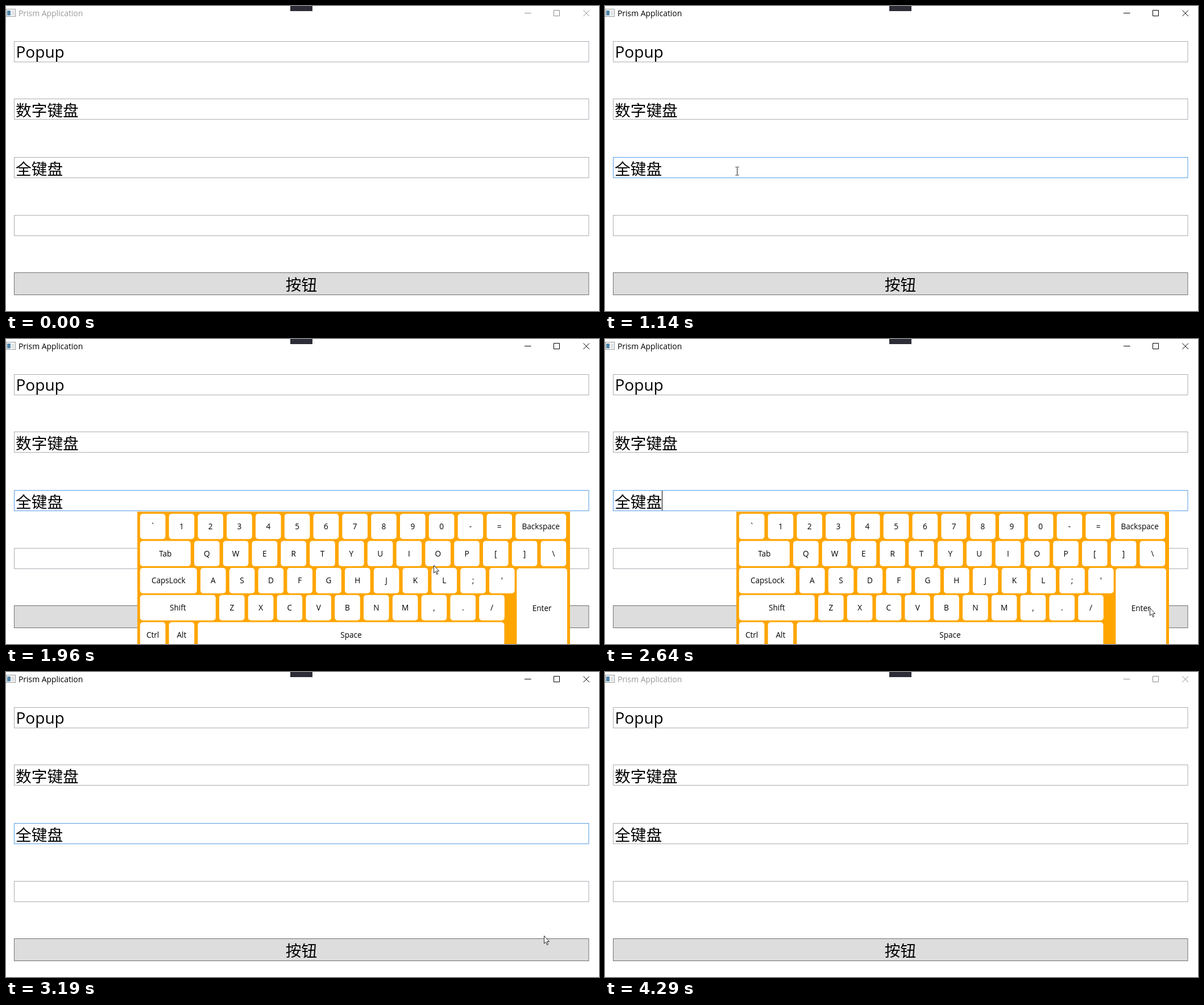
Write an HTML page that moves like this. It is 1043 px wide and 537 px high and loops after 4.37 s.

```html
<!DOCTYPE html>
<html lang="zh">
<head>
<meta charset="utf-8">
<style>
  html, body { margin: 0; width: 100%; height: 100%; overflow: hidden; background: #fff; }
  svg { display: block; width: 1043px; height: 537px; }
  text { font-family: "Open Sans", "Noto Sans", "Noto Sans CJK SC", "Noto Sans CJK", sans-serif; }
  .title { font-size: 13.9px; }
  .big { font-size: 28px; }
  .cjk { font-size: 27.7px; font-family: "Noto Sans CJK SC", "Noto Sans CJK", sans-serif; }
  .key { font-size: 13.6px; text-anchor: middle; }
  .mid { text-anchor: middle; }
</style>
</head>
<body>
<svg id="stage" viewBox="0 0 1043 537"></svg>
<script>
const LOOP = 4370;
const stage = document.getElementById('stage');

function add(parent, tag, attrs, label) {
  const node = document.createElementNS('http://www.w3.org/2000/svg', tag);
  for (const name in attrs) node.setAttribute(name, attrs[name]);
  if (label !== undefined) node.textContent = label;
  return parent.appendChild(node);
}
const rect = (parent, x, y, width, height, more) =>
  add(parent, 'rect', { x, y, width, height, ...more });
const text = (parent, x, y, cls, label) => add(parent, 'text', { x, y, class: cls }, label);
const show = (node, on) => node.setAttribute('visibility', on ? 'visible' : 'hidden');

// Window chrome
rect(stage, 0.5, 5.5, 16, 13, { fill: '#fafafa', stroke: '#9a9a9a' });
rect(stage, 2, 8, 6, 8.5, { fill: '#4f83a8' });
rect(stage, 9.5, 8, 5, 8.5, { fill: '#dfe3e6' });
const title = text(stage, 22, 18, 'title', 'Prism Application');
const chrome = add(stage, 'path', {
  d: 'M912 12.5h11.5M963.5 7.5h10v10h-10zM1015.5 7.5l10.5 10.5M1026 7.5l-10.5 10.5', fill: 'none'
});
rect(stage, 500, 0, 39, 9, { fill: '#2d2d37' });

// Text boxes and button
const fieldTops = [62.5, 163.5, 266.5, 368.5];
const fields = fieldTops.map(y => rect(stage, 14.5, y, 1010.5, 36, { fill: '#fff', stroke: '#abadb3' }));
text(stage, 17.5, 91, 'big', 'Popup');
text(stage, 17, 194, 'cjk', '数字键盘');
text(stage, 17, 296.5, 'cjk', '全键盘');
const button = rect(stage, 14.5, 469.5, 1010.5, 39, {});
text(stage, 519.5, 500.5, 'cjk mid', '按钮');
const caret = rect(stage, 100, 267, 1, 35, { fill: '#000' });

// On-screen keyboard
const board = add(stage, 'g', {});
rect(board, 231, 304, 761, 233, { fill: '#ffa500' });
const PITCH = 50.8, KEY = 44.6;

function key(x, y, w, h, label) {
  rect(board, x, y, w, h, { rx: 5, fill: '#fff' });
  text(board, x + w / 2, y + h / 2 + 5, 'key', label);
}
// Each row: [label, width] for wide keys, plain characters for normal ones
const rows = [
  [...'`1234567890-=', ['Backspace', 89]],
  [['Tab', 89], ...'QWERTYUIOP[]\\'],
  [['CapsLock', 100], ..."ASDFGHJKL;'"],
  [['Shift', 133], ...'ZXCVBNM,./'],
  [['Ctrl', KEY], ['Alt', KEY], ['Space', 539]]
];
rows.forEach((row, r) => {
  let x = 235.8;
  for (const item of row) {
    const [label, w] = Array.isArray(item) ? item : [item, KEY];
    key(x, 307.7 + r * 47.7, w, 44.6, label);
    x += w + PITCH - KEY;
  }
});
key(898.3, 403.7, 88.7, 140, 'Enter');

// Mouse pointers, each drawn around its hot spot
const arrow = add(stage, 'path', {
  d: 'M.5 .5V14L3.6 11.2 5.6 16.4 7.6 15.6 5.6 10.6H9.6Z', fill: '#fff', stroke: '#111', 'stroke-width': 0.9
});
const beam = add(stage, 'path', {
  d: 'M-3 -7h2.2l.8 .8 .8 -.8H3M-3 7.5h2.2l.8 -.8 .8 .8H3M0 -6.5V7', fill: 'none', stroke: '#222'
});

const moves = [
  [70, 540, [[400, 436], [366, 410], [330, 380], [300, 350], [276, 322], [256, 304], [244, 295], [239, 291]]],
  [610, 810, [[236, 291], [235, 291], [233, 290], [232, 290]]],
  [1690, 2160, [[250, 291], [322, 297], [500, 330], [655, 368], [752, 398], [819, 442], [883, 479], [934, 478]]],
  [2230, 2300, [[949, 475], [956, 472]]],
  [2500, 2640, [[957, 472], [957, 473], [958, 473]]],
  [2780, 3190, [[958, 473], [958, 473], [957, 472], [954, 470], [949, 466], [946, 464]]],
  [3320, 3820, [[952, 468], [968, 478], [986, 492], [1003, 506], [1009, 517], [1012, 526], [1013, 533], [1013, 540]]]
];

function pointer(t) {
  const move = moves.filter(m => m[0] <= t).pop();
  if (!move) return [0, 600];
  const [start, end, points] = move;
  const last = points.length - 1;
  const step = Math.floor((t - start) / (end - start) * last + 0.05);
  return points[Math.min(step, last)];
}

const between = (t, a, b) => t >= a && t < b;

function draw(t) {
  const [x, y] = pointer(t);
  const active = between(t, 1010, 4290);
  const focused = between(t, 1080, 4290);
  const open = between(t, 1150, 2920);
  const blocked = open && y >= 304 && x >= 231 && x < 992;

  title.setAttribute('fill', active ? '#000' : '#999');
  chrome.setAttribute('stroke', active ? '#000' : '#8c8c8c');

  let overField = false;
  fields.forEach((field, i) => {
    const hover = !blocked && between(y, fieldTops[i], fieldTops[i] + 36.5);
    overField = overField || hover;
    field.setAttribute('stroke', i === 2 && focused ? '#569de5' : hover ? '#7eb4ea' : '#abadb3');
  });

  const hot = !blocked && between(y, 469, 509);
  button.setAttribute('fill', hot ? '#bee6fd' : '#ddd');
  button.setAttribute('stroke', hot ? '#3c7fb1' : '#707070');

  show(caret, between(t, 1150, 1690) || between(t, 2230, 2780) || between(t, 3320, 3890));
  show(board, open);
  show(arrow, !overField);
  show(beam, overField);
  arrow.setAttribute('transform', `translate(${x} ${y})`);
  beam.setAttribute('transform', `translate(${x + 0.5} ${y + 0.5})`);
}

const began = performance.now();
function tick() {
  draw((performance.now() - began) % LOOP);
  requestAnimationFrame(tick);
}
tick();
</script>
</body>
</html>
```
